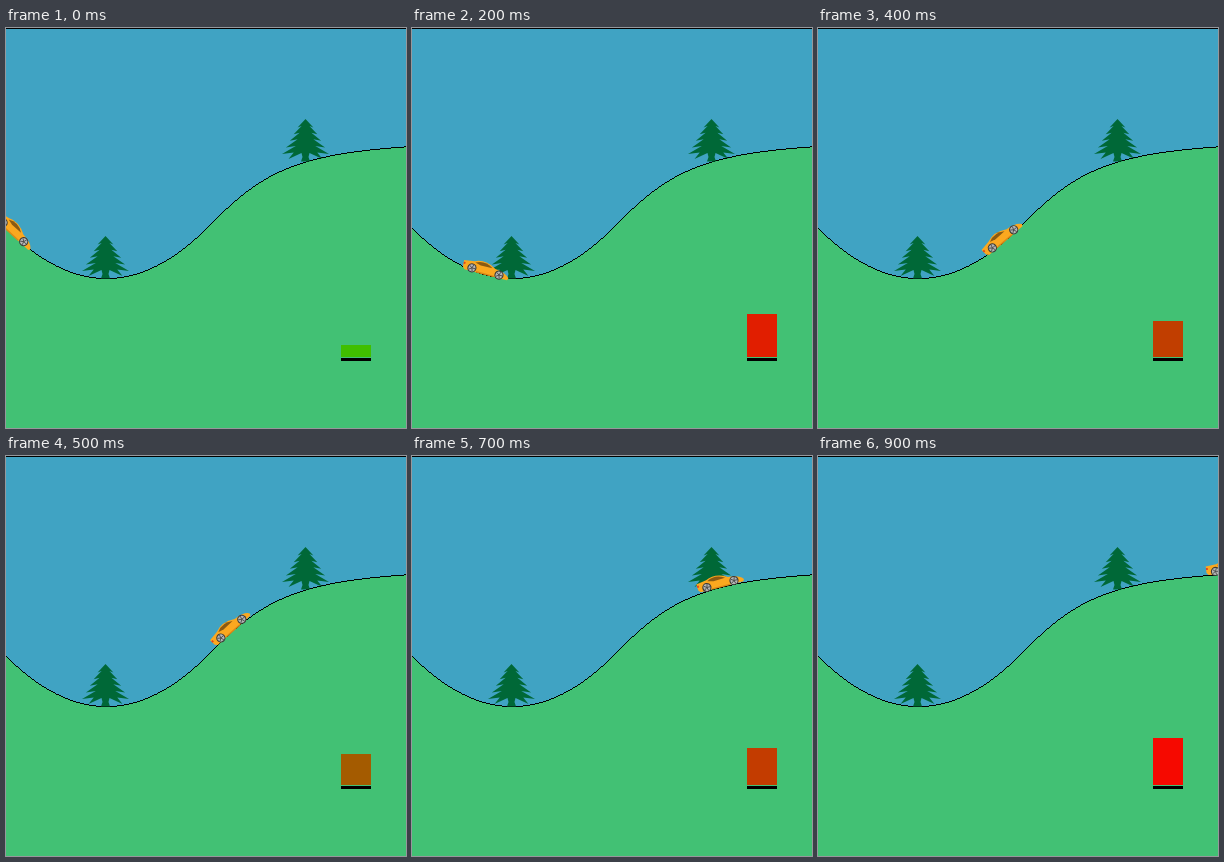
These frames come from a looping animation (400x400 px, 1.1 s). An HTML page with a canvas:

```html
<!DOCTYPE html>
<html lang="en">
<head>
<meta charset="utf-8">
<title>Car on the hill</title>
<style>
  html, body { margin: 0; width: 100%; height: 100%; overflow: hidden; }
  canvas { display: block; }
</style>
</head>
<body>
<canvas id="stage" width="400" height="400"></canvas>
<script>
const c = document.getElementById("stage").getContext("2d");

// The hill over p = -1..1: a parabola on the left, a saturating rise on the right
const height = p => p < 0 ? p * p + p : p / Math.sqrt(1 + 5 * p * p);
const slope = p => p < 0 ? 2 * p + 1 : (1 + 5 * p * p) ** -1.5;
const bend = p => p < 0 ? 2 : -15 * p * (1 + 5 * p * p) ** -2.5;

const toX = p => 200 + 200 * p;
const toY = p => 200 - 200 * height(p);
const lineY = x => Math.round(toY(x / 200 - 1));

// Unit mass under gravity and constant thrust, sampled every 0.1 s
function drive(count) {
  const gravity = 9.81, thrust = 4, dt = 0.001;
  const states = [];
  let p = -0.963, v = 0.755;
  for (let i = 0; i < count; i++) {
    states.push({ p, v });
    for (let t = 0; t < 100; t++) {
      const s = slope(p);
      v += dt * (thrust - gravity * s - v * v * s * bend(p)) / (1 + s * s);
      p += dt * v;
    }
  }
  return states;
}

const states = drive(10);

function rect(color, x, y, w, h) {
  c.fillStyle = color;
  c.fillRect(x, y, w, h);
}

function disc(color, x, y, r) {
  c.fillStyle = color;
  c.beginPath();
  c.arc(x, y, r, 0, 7);
  c.fill();
}

function fill(color, path) {
  c.fillStyle = color;
  c.fill(new Path2D(path));
}

function landscape() {
  rect("#40a3c3", 0, 0, 400, 400);
  for (let x = 0; x < 400; x++) {
    const y = lineY(x);
    rect("#42c174", x, y, 1, 400 - y);
    rect("#000", x, y, 1, 1);
  }
  rect("#000", 0, 0, 400, 1);
}

// Each tier of branches is wider than the one above, with a notch under its tip
function tree(x) {
  const half = [[0, 0]];
  for (let i = 1; i <= 5; i++) {
    const w = 4 + 3.9 * i, y = 2 + 6.6 * i;
    half.push([w, y], [w * 0.5, y - 1.5]);
  }
  half.push([17, 40], [4, 34], [3, 38], [4.5, 42.5]);
  const mirrored = half.map(([a, b]) => [-a, b]).reverse();
  c.save();
  c.translate(x - 0.5, lineY(x) - 42);
  fill("#006837", "M" + half.concat(mirrored).join("L"));
  c.restore();
}

function wheel(x) {
  disc("#3b3a38", x, 0, 4.6);
  disc("#b5b5b5", x, 0, 3.5);
  c.strokeStyle = "#444";
  c.lineWidth = 0.8;
  c.beginPath();
  for (let i = 0; i < 5; i++) {
    const a = i * Math.PI * 0.4;
    c.moveTo(x, 0);
    c.lineTo(x + 3.5 * Math.cos(a), 3.5 * Math.sin(a));
  }
  c.stroke();
}

function car(p) {
  c.save();
  c.translate(toX(p), toY(p) - 3);
  c.rotate(-Math.atan(slope(p)));
  fill("#fba81f", "M-23.5-5.5L-13-7.2Q-3-12 9-5Q21-4 24 1L23 3L-21 3.2L-23 1Z");
  fill("#8a5a12", "M-12-6Q-3-11 6-4.8L-6-4.5Z");
  rect("#d98a17", -9, 2, 18, 1.4);
  rect("#e2431e", -23.3, -4, 1.8, 2);
  wheel(-14);
  wheel(14);
  c.restore();
}

function speedBar(v) {
  const red = Math.round(255 * Math.min(1, v / 3));
  const h = Math.round(16.1 * v);
  rect(`rgb(${red},${255 - red},0)`, 335, 329 - h, 30, h);
  rect("#000", 335, 330, 30, 3);
}

function draw() {
  const step = Math.floor(performance.now() % 1100 / 100);
  const { p, v } = states[Math.min(step, states.length - 1)];
  landscape();
  tree(100);
  tree(300);
  car(p);
  speedBar(v);
  requestAnimationFrame(draw);
}
draw();
</script>
</body>
</html>
```
